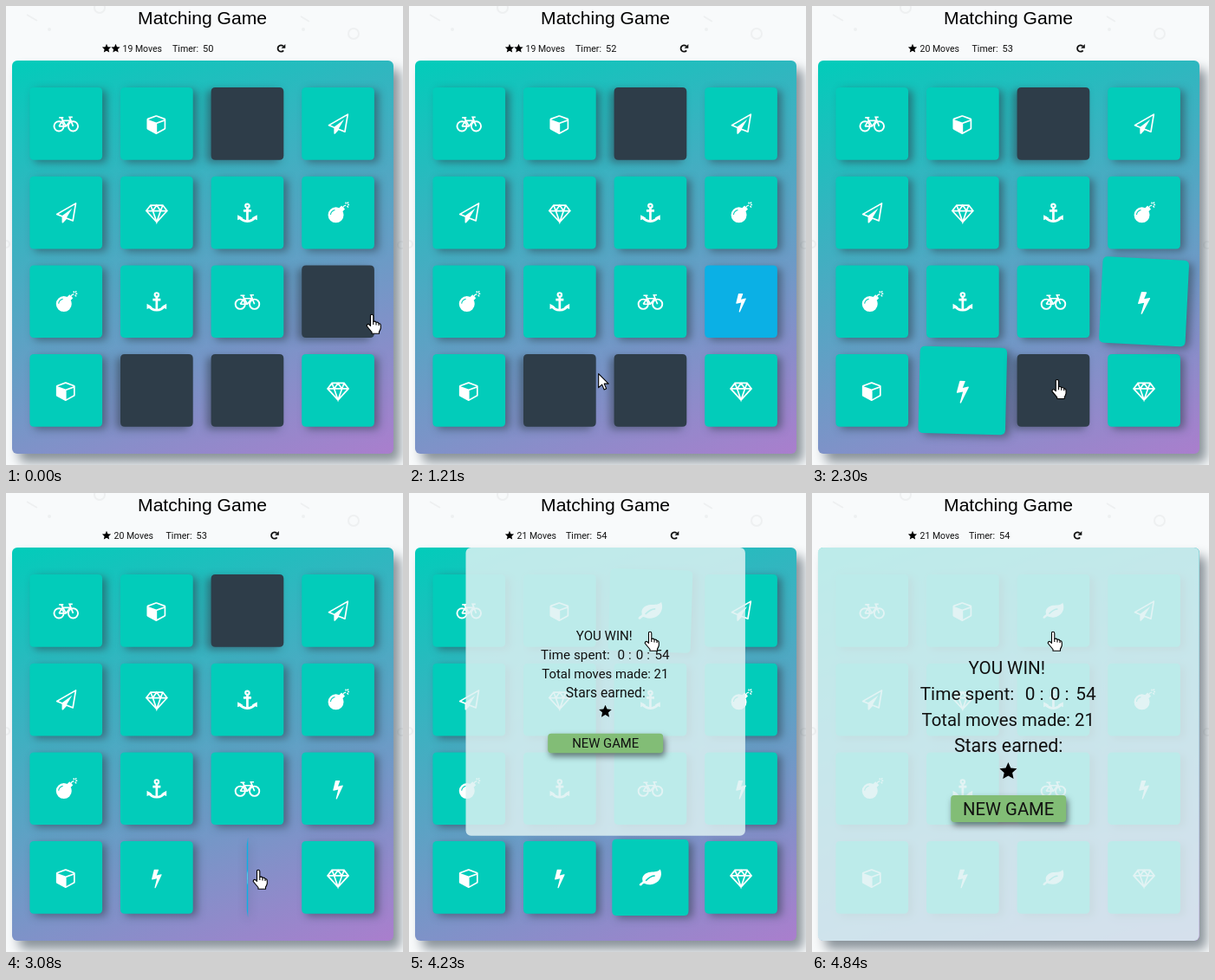
An HTML page with a canvas for the animation above (5620 ms loop, 458 by 530 pixels).

```html
<!DOCTYPE html>
<html lang="en">
<head>
<meta charset="utf-8">
<title>Matching Game</title>
<style>
html, body { margin: 0; width: 100%; height: 100%; overflow: hidden; background: #f8fafb; }
canvas { display: block; width: 458px; height: 530px; }
</style>
</head>
<body>
<canvas id="stage" width="458" height="530"></canvas>
<script>
const ctx = document.getElementById('stage').getContext('2d');
const LOOP = 5620;
const SIZE = 83.7;
const TEAL = '#02ccba', BLUE = '#0bb0e5', DARK = '#2e3d49';
const FONT = 'Roboto, "Open Sans", sans-serif';
const clamp = v => Math.max(0, Math.min(1, v));
const P = d => new Path2D(d);

// Each icon is a list of layers: path, stroke width (0 = fill), optional cut-out, scale and centre.
const ICONS = {
  diamond: [{ p: P('M-7-8.5H7L12-2 0 11-12-2ZM-12-2H12M-7-8.5L-4.5-2 0 11 4.5-2 7-8.5M-4.5-2L0-8.5 4.5-2'), w: 1.7 }],
  anchor: [
    { p: P('M2.2-7.8A2.2 2.2 0 1 1-2.2-7.8A2.2 2.2 0 1 1 2.2-7.8'), w: 2.2 },
    { p: P('M0-5.5V9M-4.5-2.2H4.5M-9.2 5Q-6.5 9.6 0 10Q6.5 9.6 9.2 5'), w: 2.7 },
    { p: P('M-11.3 2.6V8.8L-5.2 6.3ZM11.3 2.6V8.8L5.2 6.3Z'), w: 0 }
  ],
  bomb: [
    { p: P('M6.5 2.8A9 9 0 1 1-11.5 2.8A9 9 0 1 1 6.5 2.8M1-5L4-8 8-4 5-1Z'), w: 0, rule: 'nonzero' },
    { p: P('M5-5Q7-9 9-8M9-10V-12M11-9H13M10.5-10.5L12-12M10.3-7.5L12-6'), w: 1.4 },
    { p: P('M-8.6 2.4Q-8-2-3.6-3'), w: 1.1, cut: true }
  ],
  cube: [{
    p: P('M896 1629l640-349v-636l-640 233v752zm-64-865l698-254-698-254-698 254zm832-252v768q0 35-18 65t-49 47l-704 384q-28 16-61 16t-61-16l-704-384q-31-17-49-47t-18-65v-768q0-40 23-73t61-47l704-256q22-8 44-8t44 8l704 256q38 14 61 47t23 73z'),
    w: 0, s: .0131, c: [870, 870]
  }],
  plane: [{
    p: P('M1764 11q33 24 27 64l-256 1536q-5 29-32 45-14 8-31 8-11 0-24-5l-527-215-298 327q-18 21-47 21-14 0-23-4-19-7-30-23.5t-11-36.5v-452l-472-193q-37-14-40-55-3-39 32-59l1664-960q35-21 68 2zm-342 1499l221-1323-1434 827 336 137 863-639-478 797z'),
    w: 0, s: .0131, c: [870, 880]
  }],
  bolt: [{
    p: P('M1333 566q18 20 7 44l-540 1157q-13 25-42 25-4 0-14-2-17-5-25.5-19t-4.5-30l197-808-406 101q-4 1-12 1-18 0-31-11-18-15-13-39l201-825q4-16 16-26t28-10h328q19 0 32 12.5t13 29.5q0 8-5 18l-171 463 396-98q8-2 12-2 19 0 34 15z'),
    w: 0, s: .0129, c: [896, 840]
  }],
  leaf: [
    { p: P('M10.8-9C14-2 10 7 0 7.8C-4 8-6 6.5-7 6.5C-8.5 6.5-9 9-10.5 9C-12 9-12.5 8-11.5 7C-10 5-8 5-8.5 3.5C-10-2-5-5.5 0-6C5-6.4 8-6 10.8-9Z'), w: 0 },
    { p: P('M-5 3.6C-2 .6 1-1.8 5-1.8'), w: 1.5, cut: true }
  ],
  bike: [
    { p: P('M-2.6 3A5.6 5.6 0 1 1-13.8 3A5.6 5.6 0 1 1-2.6 3M13.8 3A5.6 5.6 0 1 1 2.6 3A5.6 5.6 0 1 1 13.8 3'), w: 1.9 },
    { p: P('M-8.2 3L-4-3.5H5L0 3H-8.2M-5.5-7L0 3M8.2 3L4-7.5H7.5M-8-7H-3'), w: 1.7 }
  ]
};

// Cards that are still closed: opening, matching and wobble times.
const PLAY = {
  11: { open: 840, match: 2065, wobble: 2117, span: 620 },
  13: { open: 1680, match: 2065, wobble: 2098, span: 620 },
  14: { open: 2930, match: 4030, wobble: 4030, span: 800 },
  2: { open: 3683, match: 4030, wobble: 4008, span: 800 }
};
const DECK = ['bike', 'cube', 'leaf', 'plane', 'plane', 'diamond', 'anchor', 'bomb',
  'bomb', 'anchor', 'bike', 'bolt', 'cube', 'bolt', 'leaf', 'diamond'];

// Keyframes are [time, ...values], linear in between.
function track(keys, t) {
  if (t <= keys[0][0]) return keys[0].slice(1);
  for (let i = 1; i < keys.length; i++) {
    const a = keys[i - 1], b = keys[i];
    if (t < b[0]) {
      const k = (t - a[0]) / (b[0] - a[0]);
      return a.slice(1).map((v, j) => v + (b[j + 1] - v) * k);
    }
  }
  return keys[keys.length - 1].slice(1);
}

const WOBBLE = [[0, 1, 0], [.1, .9, -3], [.2, .9, -3], [.3, 1.2, 3], [.4, 1.2, -3], [.5, 1.2, 3],
  [.6, 1.2, -3], [.7, 1.2, 3], [.8, 1.2, -3], [.9, 1.2, 3], [1, 1, 0]];

const POINTER = [[430, 415, 355], [520, 408, 355], [1060, 408, 355], [1210, 219, 424], [1300, 189, 436],
  [1360, 187, 437], [1430, 187, 437], [1440, 177, 437], [2080, 177, 437], [2290, 275, 430],
  [2420, 284, 434], [3200, 284, 434], [3450, 270, 159], [3700, 270, 159], [4200, 271, 159]];
const ARROW_TIMES = [[1090, 1260], [2160, 2235], [3225, 3425]];
const HAND = P('M6 1.5Q8.5.5 8.8 3V9.5Q11 8.5 12 10.3Q14.5 9.7 15 11.5Q17.3 11.3 17.3 14V17Q16.5 20 15.5 21V23.2H7V21.5Q4 18 1.2 14.5Q1.5 12 3.5 12.5L5.5 14.3V3Q5.4 1.8 6 1.5Z');
const ARROW = P('M0 .5V16.5L4 13 6.5 18.8 9 17.7 6.5 12H11.5Z');

function shadow(color, x, y, blur) {
  ctx.shadowColor = color;
  ctx.shadowOffsetX = x;
  ctx.shadowOffsetY = y;
  ctx.shadowBlur = blur;
}

function box(x, y, w, h, r, fill) {
  ctx.beginPath();
  ctx.roundRect(x, y, w, h, r);
  ctx.fillStyle = fill;
  ctx.fill();
}

function text(str, x, y, size, align = 'left', family = FONT) {
  ctx.font = `${size}px ${family}`;
  ctx.textAlign = align;
  ctx.fillText(str, x, y);
}

function star(x, y, r) {
  ctx.beginPath();
  for (let i = 0; i < 10; i++) {
    const a = i * Math.PI / 5 - Math.PI / 2, d = i % 2 ? r * .47 : r;
    ctx.lineTo(x + d * Math.cos(a), y + d * Math.sin(a));
  }
  ctx.closePath();
  ctx.fill();
}

function drawIcon(name, back) {
  for (const { p, w, cut, s = 1, c = [0, 0], rule = 'evenodd' } of ICONS[name]) {
    ctx.save();
    ctx.scale(s, s);
    ctx.translate(-c[0], -c[1]);
    ctx.fillStyle = ctx.strokeStyle = cut ? back : '#fff';
    ctx.lineWidth = w;
    if (w) ctx.stroke(p); else ctx.fill(p, rule);
    ctx.restore();
  }
}

// Rounded square turned about its vertical axis, seen from 400px.
function turnedSquare(angle) {
  const h = SIZE / 2, r = 5;
  const at = (x, y) => {
    const k = 400 / (400 - x * Math.sin(angle));
    return [x * Math.cos(angle) * k, y * k];
  };
  ctx.beginPath();
  for (const [sx, sy] of [[-1, -1], [1, -1], [1, 1], [-1, 1]]) {
    const a = at(sx * h, sy * (h - r)), b = at(sx * (h - r), sy * h), c = at(sx * h, sy * h);
    const [from, to] = sx * sy > 0 ? [a, b].sort(() => 0) : [a, b];
    const [p, q] = sx === sy ? [from, to] : [to, from];
    ctx.lineTo(...p);
    ctx.quadraticCurveTo(...c, ...q);
  }
  ctx.closePath();
}

function drawCard(i, t) {
  const play = PLAY[i];
  let angle = 0, fill = TEAL, scale = 1, rot = 0;
  if (play) {
    const k = clamp((t - play.open) / 300);
    angle = Math.PI * (1 + Math.cos(Math.PI * k)) / 2;
    fill = t < play.open ? DARK : t < play.match ? BLUE : TEAL;
    [scale, rot] = track(WOBBLE, (t - play.wobble) / play.span);
  }
  ctx.save();
  ctx.translate(27.4 + 104.6 * (i % 4) + SIZE / 2, 94 + 102.7 * (i >> 2) + SIZE / 2);
  ctx.rotate(rot * Math.PI / 180);
  ctx.scale(scale, scale);
  ctx.save();
  shadow('rgba(46,61,73,.55)', 5 * Math.cos(angle), 3, 10);
  turnedSquare(angle);
  ctx.fillStyle = fill;
  ctx.fill();
  ctx.restore();
  if (angle < Math.PI / 2) {
    ctx.scale(Math.cos(angle), 1);
    drawIcon(DECK[i], fill);
  }
  ctx.restore();
}

function drawPage() {
  ctx.fillStyle = '#f8fafb';
  ctx.fillRect(0, 0, 458, 530);
  ctx.strokeStyle = '#eef0f1';
  ctx.lineWidth = 2;
  for (const [x, y, r] of [[108, 2, 6], [401, 32, 6], [0, 275, 4], [456, 276, 4]]) {
    ctx.beginPath();
    ctx.arc(x, y, r, 0, 7);
    ctx.stroke();
  }
  ctx.stroke(P('M24 10L36 17M340 12L350 18'));
  ctx.fillStyle = '#eef0f1';
  for (const [x, y] of [[50, 27], [343, 27]]) {
    ctx.beginPath();
    ctx.arc(x, y, 2, 0, 7);
    ctx.fill();
  }
}

function drawHeader(t) {
  const moves = t < 1680 ? 19 : t < 3683 ? 20 : 21;
  const secs = 50 + (t >= 210) + (t >= 1210) + (t >= 2210) + (t >= 3210);
  const left = { 19: 192, 20: 184.5, 21: 181 }[moves];
  ctx.fillStyle = '#000';
  text('Matching Game', 226.5, 21, 21.1, 'center', '"Liberation Sans", Arial, sans-serif');
  star(116, 49.2, 5.4);
  if (moves < 20) star(126.5, 49.2, 5.4);
  ctx.fillStyle = '#111';
  text(moves + ' Moves', moves < 20 ? 134.5 : 124.5, 53, 10.5);
  text('Timer:', left, 53, 10.6);
  text(secs, left + 35, 53, 11);

  ctx.save();
  ctx.translate(left + 125.3 - (secs === 51 ? 3 : 0), 49);
  ctx.strokeStyle = '#111';
  ctx.lineWidth = 1.8;
  ctx.beginPath();
  ctx.arc(0, 0, 3.7, .7, 5.5);
  ctx.stroke();
  ctx.fill(P('M5-5V-.3H.3Z'));
  ctx.restore();
}

function drawDeck(t) {
  const grad = ctx.createLinearGradient(128.3, 18.9, 325.7, 561.1);
  grad.addColorStop(0, TEAL);
  grad.addColorStop(1, '#aa7ecd');
  ctx.save();
  shadow('rgba(46,61,73,.55)', 8, 10, 13);
  box(7, 63, 440, 454, 6, grad);
  ctx.restore();
  const last = i => PLAY[i] ? 1 : 0;
  [...DECK.keys()].sort((a, b) => last(a) - last(b)).forEach(i => drawCard(i, t));
}

function drawModal(t) {
  const s = 1 - Math.pow(1 - clamp((t - 4110) / 340), 3);
  if (!s) return;
  ctx.save();
  ctx.translate(226.7, 63);
  ctx.beginPath();
  ctx.roundRect(-220 * s, 0, 440 * s, 454 * s, 6);
  ctx.fillStyle = 'rgba(221,241,243,.85)';
  ctx.fill();
  ctx.clip();

  ctx.save();
  shadow('rgba(0,0,0,.5)', 2, 4, 7);
  const top = 19 + 267 * s;
  box(-66.5, top, 133, 31 * s, 4, '#82bd76');
  ctx.restore();

  ctx.fillStyle = '#111';
  text('NEW GAME', 0, top + 22.5 * s, 20.3 * s, 'center');
  ctx.scale(s, s);
  text('YOU WIN!', -2, 145.5, 20.6, 'center');
  text('Time spent:', -102, 175.5, 20.8);
  text('0 :', 19, 175.5, 20.8);
  text('0 :', 48, 175.5, 20.8);
  text('54', 77.5, 175.5, 20.8);
  text('Total moves made: 21', -.5, 205.5, 20.3, 'center');
  text('Stars earned:', 0, 235.5, 21.4, 'center');
  ctx.fillStyle = '#000';
  star(-.3, 258.5, 10.5);
  ctx.restore();
}

function drawPointer(t) {
  const [x, y] = track(POINTER, t);
  const shape = ARROW_TIMES.some(([a, b]) => t >= a && t < b) ? ARROW : HAND;
  ctx.save();
  ctx.translate(x, y);
  ctx.fillStyle = '#fff';
  ctx.strokeStyle = '#000';
  ctx.lineWidth = 1.1;
  ctx.lineJoin = 'round';
  ctx.fill(shape);
  ctx.stroke(shape);
  if (shape === HAND) ctx.stroke(P('M8.8 9.5V13M12 10.3V13.5M15 11.5V14'));
  ctx.restore();
}

const start = performance.now();
function frame() {
  const t = (performance.now() - start) % LOOP;
  drawPage();
  drawDeck(t);
  drawHeader(t);
  drawModal(t);
  drawPointer(t);
  requestAnimationFrame(frame);
}
frame();
</script>
</body>
</html>
```
